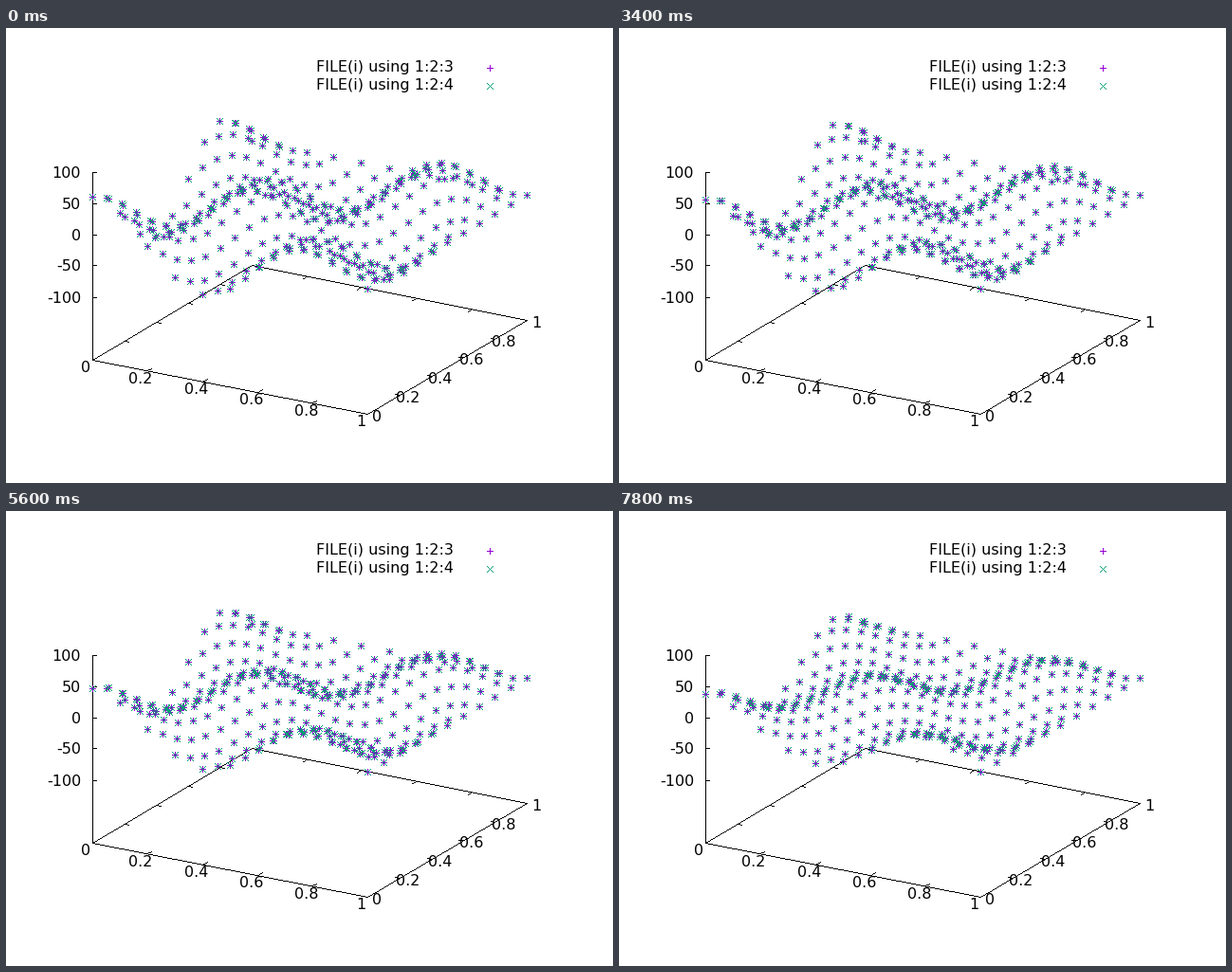
A matplotlib script that plays this animation: 640 by 480 pixels, repeating every 8000 ms.

```python
import numpy as np
import matplotlib.pyplot as plt
from matplotlib.animation import FuncAnimation

W, H, DPI = 640, 480, 100
FRAMES, INTERVAL = 40, 200
K = 2.5 * np.pi
MID_X, MID_Y = 320, 230         # screen centre of the plot box
SCALE_X, SCALE_Y = 336, 229
SIN, COS = 0.5, np.sqrt(0.75)   # view turned by 30 degrees, tilted by 60

PURPLE, GREEN, BLACK = (148, 0, 211), (0, 158, 115), (0, 0, 0)

ARM = np.arange(-3, 4)
ZERO = np.zeros(7, int)
PLUS = (np.r_[ARM, ZERO], np.r_[ZERO, ARM])
CROSS = (np.r_[ARM, ARM], np.r_[ARM, -ARM])


def project(x, y, z=-200, dx=0, dy=0):
    """Whole pixel of a data point, truncated towards the box centre."""
    u, v, w = x - 0.5, y - 0.5, (z + 50) / 300
    px = (COS * u + SIN * v) * SCALE_X + dx
    py = ((SIN * u - COS * v) * SIN - COS * w) * SCALE_Y + dy
    return (MID_X + np.trunc(px).astype(int),
            MID_Y + np.trunc(py).astype(int))


def height(n):
    """Peak of the slowly sinking wave, in data units."""
    return 61.6 - 21.3 * (1 - np.cos(0.0428 * n))


def draw_line(img, p, q):
    n = int(max(abs(q[0] - p[0]), abs(q[1] - p[1]))) + 1
    cols = np.rint(np.linspace(p[0], q[0], n)).astype(int)
    rows = np.rint(np.linspace(p[1], q[1], n)).astype(int)
    img[rows, cols] = BLACK


def stamp(img, shape, cx, cy, ink):
    """Draw one marker shape at every given centre."""
    rows = np.add.outer(cy, shape[1])
    cols = np.add.outer(cx, shape[0])
    img[rows, cols] = ink


def make_backdrop():
    img = np.full((H, W, 3), 255, np.uint8)
    corners = [(0, 0), (1, 0), (1, 1), (0, 1)]
    for a, b in zip(corners, corners[1:] + corners[:1]):
        draw_line(img, project(*a), project(*b))
    draw_line(img, project(0, 0), project(0, 0, 100))
    for z in range(-100, 101, 50):
        col, row = project(0, 0, z)
        draw_line(img, (col, row), (col + 4, row))
    dx, dy = 0.015, 0.025
    for t in (0.2, 0.4, 0.6, 0.8):
        draw_line(img, project(t, 0), project(t, dy))
        draw_line(img, project(t, 1), project(t, 1 - dy))
        draw_line(img, project(0, t), project(dx, t))
        draw_line(img, project(1, t), project(1 - dx, t))
    stamp(img, PLUS, 510, 42, PURPLE)
    stamp(img, CROSS, 510, 61, GREEN)
    return img


def make_nodes():
    """Corners of a 10 x 10 mesh plus the centroids of its triangles."""
    corner = np.arange(11) / 10
    cell = np.arange(10) / 10
    parts = [np.meshgrid(corner, corner)]
    for shift in (1 / 30, 2 / 30):
        parts.append(np.meshgrid(cell + shift, cell + shift))
    x = np.concatenate([p[0].ravel() for p in parts])
    y = np.concatenate([p[1].ravel() for p in parts])
    return x, y


def render(n):
    img = backdrop.copy()
    cx, cy = project(node_x, node_y, mode * height(n))
    stamp(img, PLUS, cx, cy, PURPLE)
    stamp(img, CROSS, cx, cy, GREEN)
    return img


node_x, node_y = make_nodes()
mode = np.cos(K * node_x) * np.cos(K * node_y)
backdrop = make_backdrop()

plt.rcParams["font.family"] = "DejaVu Sans"
fig = plt.figure(figsize=(W / DPI, H / DPI), dpi=DPI, facecolor="white")
ax = fig.add_axes([0, 0, 1, 1])
ax.axis("off")
picture = ax.imshow(render(0), extent=(0, W, H, 0), aspect="auto",
                    interpolation="nearest")


def label(x, y, text, ha="center"):
    ax.text(x, y, text, ha=ha, va="baseline", fontsize=16 * 72 / DPI)


label(472, 46, "FILE(i) using 1:2:3", "right")
label(472, 65, "FILE(i) using 1:2:4", "right")
for z in range(-100, 101, 50):
    label(79, project(0, 0, z)[1] + 6, str(z), "right")
for k, text in enumerate(("0", "0.2", "0.4", "0.6", "0.8", "1")):
    label(*project(k / 5, 0, dx=-6.9, dy=13.5), text)
    label(*project(1, k / 5, dx=9.6, dy=8), text)


def update(n):
    picture.set_data(render(n))
    return [picture]


anim = FuncAnimation(fig, update, frames=FRAMES, interval=INTERVAL,
                     repeat=True, repeat_delay=0, blit=False)
plt.show()
```
